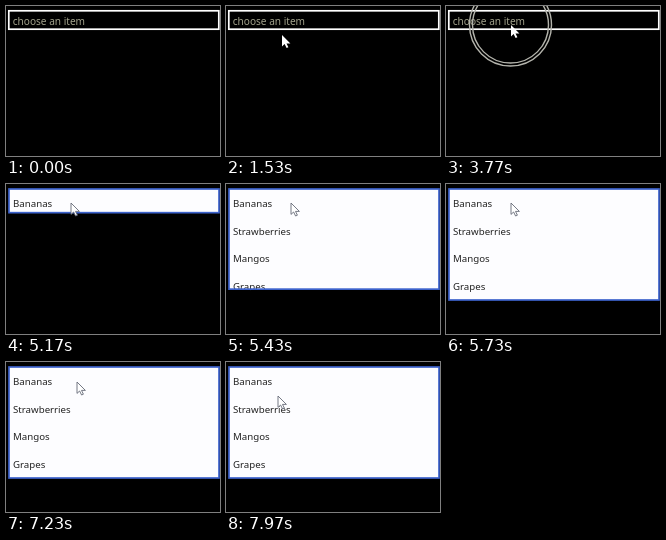
Write an HTML page that moves like this. It is 214 by 150 pixels and loops after 8 s.

```html
<!DOCTYPE html>
<html lang="en">
<head>
<meta charset="utf-8">
<title>Combo box</title>
<style>
  html, body { margin: 0; width: 100%; height: 100%; overflow: hidden; background: #000; }
  svg { display: block; width: 214px; height: 150px; }
  text { font-family: "Noto Sans", "Open Sans", sans-serif; font-size: 9.7px; fill: #222; }
  #closed text { font-size: 10.1px; fill: #a3a38c; }
  .box { stroke-width: 1.7; }
</style>
</head>
<body>
<svg viewBox="0 0 214 150">
  <clipPath id="clip"><rect id="view" x="2" y="4" width="212"/></clipPath>
  <g id="closed">
    <rect class="box" x="2.8" y="4.8" width="210" height="18.4" fill="#000" stroke="#fff"/>
    <text x="6.7" y="18.7">choose an item</text>
  </g>
  <g id="open">
    <rect id="panel" x="3" y="5" width="210" fill="#fdfdff"/>
    <g id="items" clip-path="url(#clip)"></g>
    <rect id="frame" class="box" x="3" y="5" width="210" fill="none" stroke="#3c62cc"/>
  </g>
  <g id="ring" fill="none" stroke="#b4b4ac" stroke-width="1.4">
    <circle cx="64.5" cy="19" r="41"/>
    <circle cx="64.5" cy="19" r="38"/>
  </g>
  <path id="cursor" d="M0 0V11.4L2.6 9 4.6 13 6.4 12.2 4.5 8.4H8.4Z" fill="#fff" stroke-width=".9"/>
</svg>
<script>
const LOOP = 8000, OPEN_AT = 5160, OPEN_TIME = 530;
const CLOSED_BOTTOM = 24, OPEN_BOTTOM = 117;
const APPEAR = 1090;

// Pointer gestures, each starting where the previous one ended
const gestures = [
  { from: APPEAR, to: 1790, x: 59, y: 27 },
  { from: 2210, to: 2790, x: 63, y: 21 },
  { from: 2930, to: 3490, x: 65, y: 19 },
  { from: 5990, to: 6250, x: 70, y: 19 },
  { from: 6810, to: 7230, x: 71, y: 20 },
  { from: 7650, to: 7970, x: 52, y: 34 }
];

const el = id => document.getElementById(id);
const show = (id, on) => el(id).setAttribute("visibility", on ? "visible" : "hidden");
const progress = (t, from, to) => Math.min(1, Math.max(0, (t - from) / (to - from)));
const easeOut = p => 1 - (1 - p) ** 3;

el("items").innerHTML = ["Bananas", "Strawberries", "Mangos", "Grapes"]
  .map((name, i) => `<text x="7" y="${23.4 + 27.4 * i}">${name}</text>`).join("");

function pointer(t) {
  let x = 0, y = 67;
  for (const g of gestures) {
    const k = easeOut(progress(t, g.from, g.to));
    x += (g.x - x) * k;
    y += (g.y - y) * k;
  }
  return [Math.round(x), Math.round(y)];
}

function draw(t) {
  const open = t >= OPEN_AT;
  show("closed", !open);
  show("open", open);
  show("ring", t >= 3630 && t < 4330);
  show("cursor", t >= APPEAR);

  const k = easeOut(progress(t, OPEN_AT, OPEN_AT + OPEN_TIME));
  const bottom = CLOSED_BOTTOM + (OPEN_BOTTOM - CLOSED_BOTTOM) * k;
  el("view").setAttribute("height", bottom - 4);
  for (const id of ["panel", "frame"]) el(id).setAttribute("height", bottom - 6);

  el("cursor").setAttribute("transform", `translate(${pointer(t)})`);
  el("cursor").setAttribute("stroke", open ? "#666a78" : "none");
}

const start = performance.now();
function tick() {
  draw((performance.now() - start) % LOOP);
  requestAnimationFrame(tick);
}
tick();
</script>
</body>
</html>
```
